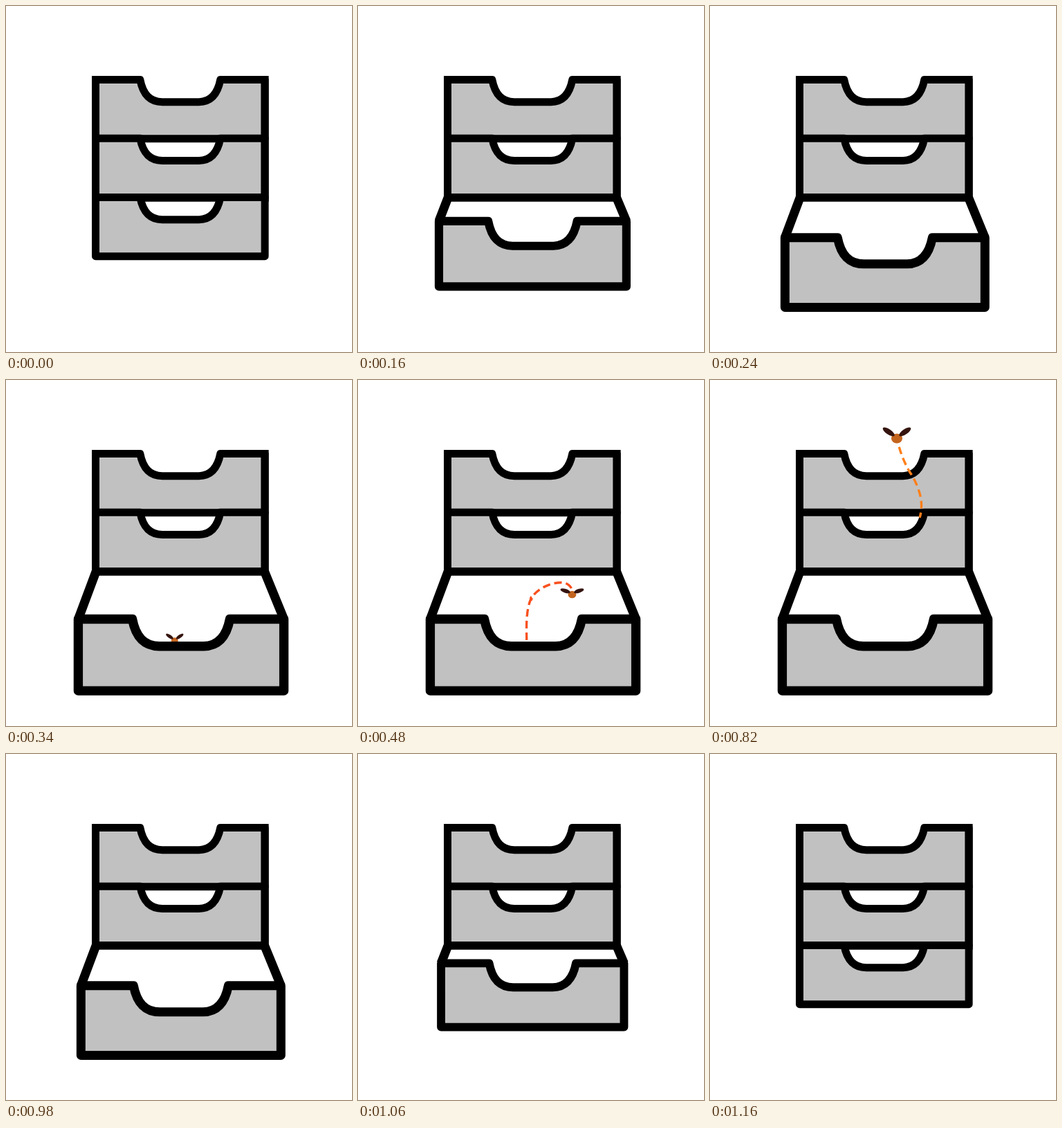
An HTML page that plays this animation: 500 px wide and 500 px high, repeating every 1420 ms.

```html
<!DOCTYPE html>
<html lang="en">
<head>
<meta charset="utf-8">
<title>Drawer</title>
<style>
  html, body { margin: 0; height: 100%; overflow: hidden; background: #fff; }
  svg { display: block; width: 100vw; height: 100vh; }
  .line { fill: none; stroke: #000; stroke-width: 11; }
  #sides { stroke-width: 13; }
</style>
</head>
<body>
<svg viewBox="0 0 500 500">
  <defs>
    <!-- Drawer front, origin at the middle of its top edge -->
    <path id="panel" fill="#c1c1c1" stroke="#000" stroke-width="11" stroke-linejoin="round"
      d="M-122.3 0H-58C-54 21 -44 32 -26 32.3H27C44 32 54 21 58 0H122.3V85.3H-122.3Z"/>
    <linearGradient id="ink" gradientUnits="userSpaceOnUse" x1="0" y1="276" x2="0" y2="278">
      <stop offset="0" stop-color="#ff7f1a"/>
      <stop offset="1" stop-color="#f8501e"/>
    </linearGradient>
    <path id="route" d="M244 384C243 352 243 332 250 316C259 301 280 291 298 293
      C306 295 312 303 309 311C302 325 284 328 272 327C260 325 252 320 248 312
      C243 300 244 290 250 278C262 255 285 238 296 217C308 193 308 175 300 155
      C296 144 292 138 288 132C280 118 274 102 270 84"/>
    <mask id="shown" maskUnits="userSpaceOnUse" x="0" y="0" width="500" height="500">
      <use id="reveal" href="#route" fill="none" stroke="#fff" stroke-width="5"/>
    </mask>
  </defs>

  <use href="#panel" x="251.8" y="106.4"/>
  <use href="#panel" x="251.8" y="191.2"/>
  <path class="line" d="M129.5 101V277.2H374.1V101"/>
  <path class="line" id="sides"/>

  <g mask="url(#shown)">
    <use href="#route" fill="none" stroke="url(#ink)" stroke-width="3.4"
      stroke-dasharray="11 6" stroke-dashoffset="9"/>
  </g>
  <g id="bug">
    <ellipse rx="8" ry="7" fill="#c4651f"/>
    <g fill="#35140f">
      <ellipse class="wing" cy="-10" rx="3.8" ry="10"/>
      <ellipse class="wing" cy="-10" rx="3.8" ry="10"/>
    </g>
  </g>

  <use id="front" href="#panel"/>
</svg>
<script>
const LOOP = 1420, STEP = 20;
const $ = id => document.getElementById(id);
const route = $('route'), total = route.getTotalLength();
const wings = document.querySelectorAll('.wing');

const clamp = x => Math.min(1, Math.max(0, x));
const ramp = (t, from, to) => clamp((t - from) / (to - from));
const smooth = x => x * x * (3 - 2 * x);
const lerp = (a, b, x) => a + (b - a) * x;

function drawDrawer(t) {
  const open = smooth(ramp(t, 0, 320)) - smooth(ramp(t, 920, 1160));
  const x = lerp(251.8, 253, open), y = lerp(276.4, 345.5, open);
  const scale = lerp(1, 1.215, open), half = 122.3 * scale;
  $('front').setAttribute('transform', `translate(${x} ${y}) scale(${scale})`);
  $('sides').setAttribute('d', `M130 277L${x - half} ${y}M373.6 277L${x + half} ${y}`);
}

function drawBug(t) {
  const head = Math.min(total, 147 * (Math.max(0, t - 320) / 160) ** 1.4);
  const tail = Math.min(head, total * smooth(ramp(t, 700, 880)));
  $('reveal').setAttribute('stroke-dasharray', `0 ${tail} ${head - tail} 9999`);

  const {x, y} = route.getPointAtLength(head);
  const size = Math.min(1, 0.75 + 0.25 * (head - 147) / 272) * (1 - ramp(t, 840, 880));
  $('bug').setAttribute('visibility', t > 320 && t < 880 ? 'visible' : 'hidden');
  $('bug').setAttribute('transform', `translate(${x} ${y + 0.5}) scale(${size})`);

  const spread = lerp(8, 72, 0.5 + 0.5 * Math.cos((t - 480) / 120 * 2 * Math.PI));
  wings.forEach((wing, i) => {
    const side = i ? 1 : -1;
    wing.setAttribute('transform', `translate(${side * 3.5} -4) rotate(${side * spread})`);
  });
}

const start = performance.now();
function frame() {
  const t = Math.floor((performance.now() - start) % LOOP / STEP) * STEP;
  drawDrawer(t);
  drawBug(t);
  requestAnimationFrame(frame);
}
frame();
</script>
</body>
</html>
```
